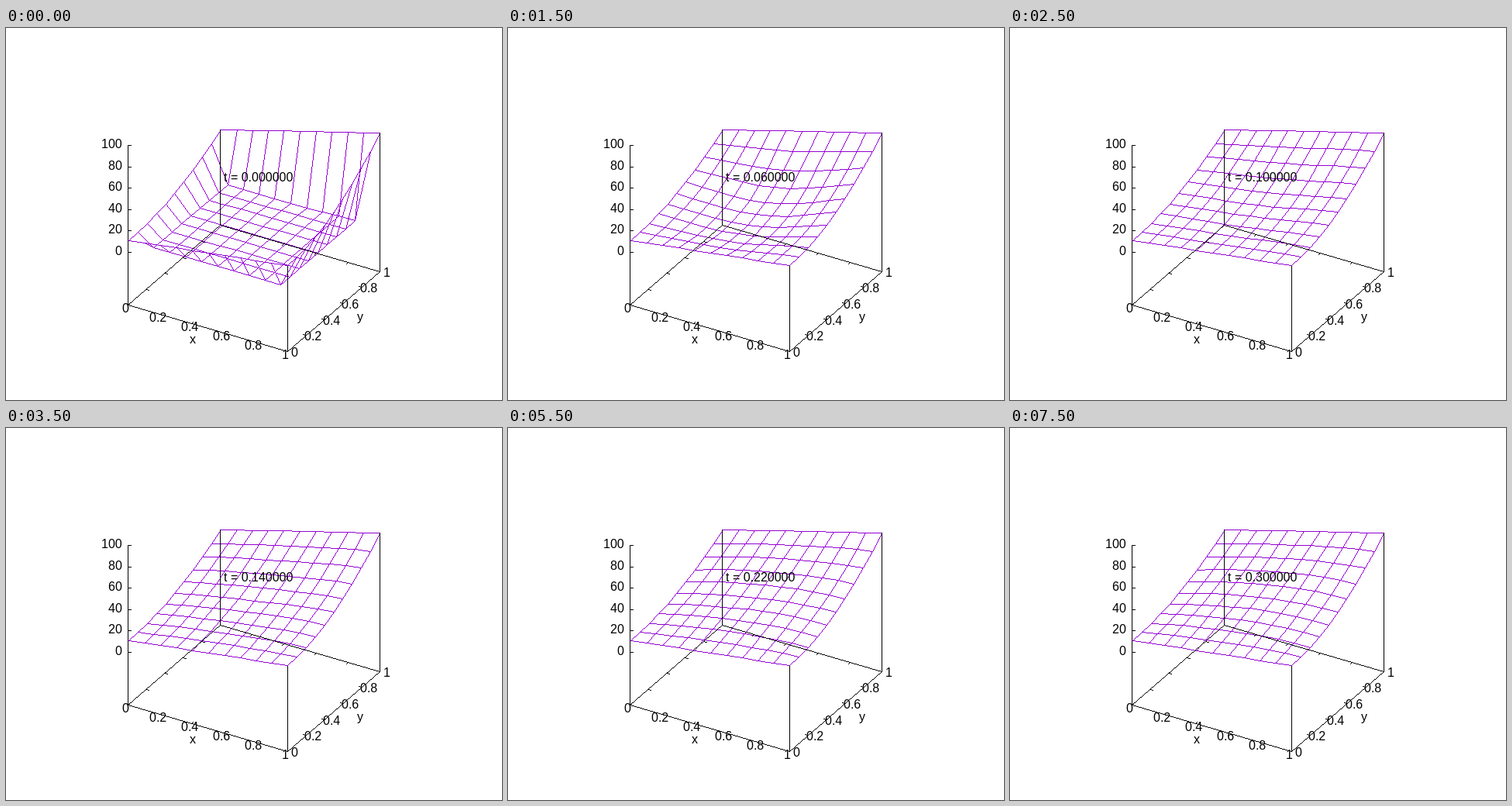
An HTML page with a canvas that plays this animation: 640x480 px, repeating every 8 s.

```html
<!DOCTYPE html>
<html>
<head>
<meta charset="utf-8">
<style>
html, body { margin: 0; width: 100%; height: 100%; overflow: hidden; background: #fff; }
canvas { display: block; }
</style>
</head>
<body>
<canvas id="stage" width="640" height="480"></canvas>
<script>
const ctx = document.getElementById('stage').getContext('2d');
const N = 10, FRAMES = 16, HOLD = 500, DT = 0.001, STEPS = 20;
const CX = 320, CY = 232, SCALE = 238, COS30 = Math.sqrt(3) / 2;

// View tilted by 60 and turned by 30 degrees, relative to the centre of the box.
function project(x, y, z) {
  const a = x - 0.5, b = y - 0.5, c = (z + 50) / 150 - 0.5;
  return [
    SCALE * (COS30 * a + b / 2),
    SCALE * (a / 4 - COS30 / 2 * b - COS30 * c)
  ];
}
// The mesh snaps towards the centre, the axes to the lower left.
const meshPixel = ([x, y]) => [CX + Math.trunc(x), CY + Math.trunc(y)];
const axisPixel = ([x, y]) => [CX + Math.floor(x), CY + Math.ceil(y)];

const edge = (x, y) => 10 + 20 * x + (30 + 20 * x) * y * y;
const inside = i => i > 0 && i < N;

// Heat equation on the unit square, fixed values on the edges.
function step(u) {
  const k = DT * N * N;
  return u.map((col, i) => col.map((v, j) => inside(i) && inside(j)
    ? v + k * (u[i - 1][j] + u[i + 1][j] + col[j - 1] + col[j + 1] - 4 * v)
    : v));
}

function solve() {
  let u = Array.from({ length: N + 1 }, (_, i) =>
    Array.from({ length: N + 1 }, (_, j) =>
      inside(i) && inside(j) ? 0 : edge(i / N, j / N)));
  const states = [u];
  while (states.length < FRAMES) {
    for (let s = 0; s < STEPS; s++) u = step(u);
    states.push(u);
  }
  return states;
}

// One pixel wide line without smoothing.
function line([x0, y0], [x1, y1]) {
  const n = Math.max(Math.abs(x1 - x0), Math.abs(y1 - y0), 1);
  for (let i = 0; i <= n; i++) {
    ctx.fillRect(Math.round(x0 + (x1 - x0) * i / n), Math.round(y0 + (y1 - y0) * i / n), 1, 1);
  }
}

// Text on whole pixels; align is the part of the width left of x.
function text(s, x, y, align = 0) {
  ctx.fillText(s, Math.floor(x - align * ctx.measureText(s).width), y);
}

function drawMesh(u) {
  const at = (i, j) => meshPixel(project(i / N, j / N, u[i][j]));
  ctx.fillStyle = '#9400d3';
  for (let i = 0; i <= N; i++) {
    for (let j = 0; j < N; j++) {
      line(at(i, j), at(i, j + 1));
      line(at(j, i), at(j + 1, i));
    }
  }
}

function drawAxes() {
  const base = (x, y) => project(x, y, -50);
  const axis = (a, b) => line(axisPixel(a), axisPixel(b));
  const tick = ([x, y], dx, dy) => axis([x, y], [x + dx, y + dy]);
  const corners = [[0, 0], [1, 0], [1, 1], [0, 1]];
  ctx.fillStyle = '#000';
  corners.forEach(([x, y], i) => {
    axis(base(x, y), base(...corners[(i + 1) % 4]));
    axis(base(x, y), project(x, y, i ? edge(x, y) : 100));
  });
  for (let i = 0; i <= 5; i++) {
    const v = i / 5, px = base(v, 0), py = base(1, v), pz = project(0, 0, 100 * v);
    tick(px, 2, -1.73);
    tick(base(v, 1), -2, 1.73);
    tick(py, -3.46, -1);
    tick(base(0, v), 3.46, 1);
    tick(pz, 4, 0);
    text(v, CX + px[0] - 2.4, axisPixel(px)[1] + 10, 0.5);
    text(v, CX + py[0] + 9.4, axisPixel(py)[1] + 7, 0.5);
    text(100 * v, 150, axisPixel(pz)[1] + 4, 1);
  }
  text('x', 237, 407);
  text('y', 453, 378);
}

const states = solve();

function draw(now) {
  const f = Math.floor(now / HOLD) % FRAMES;
  ctx.fillStyle = '#fff';
  ctx.fillRect(0, 0, 640, 480);
  ctx.font = '16px "Liberation Sans", Arial, sans-serif';
  drawMesh(states[f]);
  drawAxes();
  text('t = ' + (f * DT * STEPS).toFixed(6), 281, 198);
  requestAnimationFrame(draw);
}
requestAnimationFrame(draw);
</script>
</body>
</html>
```
